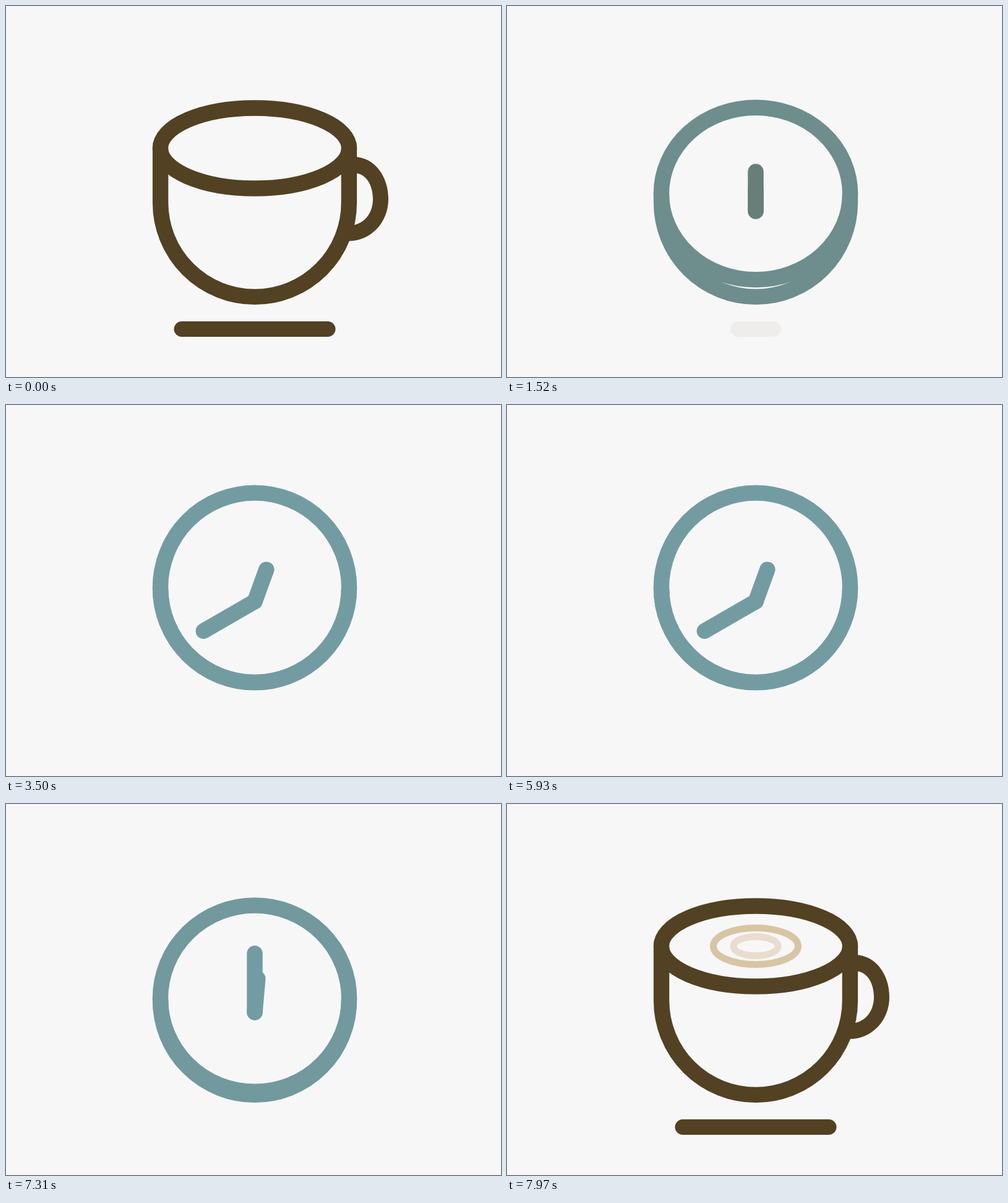
An HTML page with a canvas that plays this animation: 800x600 px, repeating every 8000 ms.

```html
<!DOCTYPE html>
<html lang="en">
<head>
<meta charset="utf-8">
<title>Cup and clock</title>
<style>
html, body { margin: 0; height: 100%; overflow: hidden; background: #f7f7f7; }
canvas { display: block; }
</style>
</head>
<body>
<canvas id="stage" width="800" height="600"></canvas>
<script>
const ctx = document.getElementById('stage').getContext('2d');
const LOOP = 8000, CX = 402, STROKE = 25.4;
const BROWN = [82, 65, 34], TEAL = [115, 156, 162], RUST = [134, 30, 31];

// Handle outline: start point, then four cubic curves
const SLIVER = [557, 292, 562, 302, 567, 315, 566.5, 325, 566, 345, 558, 365, 549.5, 377,
  549.5, 377, 552, 366, 555, 350, 555.5, 332, 556, 318, 556.5, 305, 557, 292];
const HANDLE = [562, 244, 596, 244, 618, 276, 618, 312, 618, 350, 590, 380, 554, 380,
  554, 355, 576, 355, 593, 338, 593, 312, 593, 290, 582, 270, 562, 270];

const clamp = v => Math.max(0, Math.min(1, v));
const lerp = (a, b, k) => a + (b - a) * k;
const inOut = u => u < .5 ? 4 * u ** 3 : 1 - 4 * (1 - u) ** 3;
const outBack = (u, s) => 1 + (s + 1) * (u - 1) ** 3 + s * (u - 1) ** 2;
const span = (t, start, length) => clamp((t - start) / length);
const ease = (t, start, length) => inOut(span(t, start, length));
const mix = (a, b, k) => `rgb(${a.map((v, i) => Math.round(lerp(v, b[i], clamp(k))))})`;

function stroke(color, width, trace) {
  ctx.beginPath();
  trace();
  ctx.strokeStyle = color;
  ctx.lineWidth = width;
  ctx.stroke();
}

const oval = (y, rx, ry) => ctx.ellipse(CX, y, rx, ry, 0, 0, 2 * Math.PI);

function drawHandle(open, color) {
  if (open <= 0) return;
  const p = SLIVER.map((v, i) => lerp(v, HANDLE[i], open));
  const curve = i => ctx.bezierCurveTo(...p.slice(i, i + 6));
  ctx.beginPath();
  ctx.moveTo(p[0], p[1]);
  curve(2);
  curve(8);
  ctx.lineTo(p[14], p[15]);
  curve(16);
  curve(22);
  ctx.fillStyle = color;
  ctx.fill();
}

function drawSaucer(show, color) {
  if (show <= 0) return;
  const half = 118 * (.2 + .8 * show);
  ctx.globalAlpha = show;
  stroke(color, 25, () => {
    ctx.moveTo(CX - half, 522.5);
    ctx.lineTo(CX + half, 522.5);
  });
  ctx.globalAlpha = 1;
}

function drawFoam(t, y) {
  const rings = [[7450, 68.5, 29.5, '#d7c5a3'], [7600, 36, 15.5, '#e8ddce']];
  for (const [start, rx, ry, color] of rings) {
    const g = ease(t, start, 7980 - start);
    if (g <= 0) continue;
    const size = .15 + .85 * g;
    ctx.globalAlpha = clamp(2 * g);
    stroke(color, 11, () => oval(y, rx * size, ry * size));
    ctx.globalAlpha = 1;
  }
}

function drawHand(y, length, degrees, color, width) {
  const a = degrees * Math.PI / 180;
  stroke(color, width, () => {
    ctx.moveTo(CX, y);
    ctx.lineTo(CX + length * Math.sin(a), y - length * Math.cos(a));
  });
}

function draw(t) {
  const back = t > 5000;

  // 0 is the cup, 1 is the clock
  const round = back ? 1 - ease(t, 7200, 560) : ease(t, 1145, 572);
  const lift = back ? 1 - ease(t, 7000, 350) : ease(t, 1530, 410);
  const grow = back ? 1 - ease(t, 7260, 530) : outBack(span(t, 1407, 663), 2);
  const open = back ? outBack(span(t, 7530, 420), 0) : 1 - ease(t, 1145, 330);
  const saucer = back ? ease(t, 7300, 500) : 1 - ease(t, 1145, 490);
  const hop = back ? 13 * Math.sin(Math.PI * span(t, 7590, 290)) : 0;

  const rise = 22 * lift;
  const y = lerp(230, 317.5, round) - rise - hop;
  const color = mix(BROWN, TEAL, round);

  ctx.fillStyle = '#f7f7f7';
  ctx.fillRect(0, 0, 800, 600);
  ctx.lineCap = 'round';

  drawSaucer(saucer, back ? mix(RUST, BROWN, saucer) : mix(BROWN, BROWN, 0));

  ctx.lineCap = 'butt';
  stroke(color, STROKE, () => {
    ctx.moveTo(CX - 152.4, y);
    ctx.lineTo(CX - 152.4, 318 - rise);
    ctx.arc(CX, 318 - rise, 152.4, Math.PI, 0, true);
    ctx.lineTo(CX + 152.4, y);
  });
  stroke(color, STROKE, () => oval(y, 152.6, lerp(65, 153.4, round)));
  drawHandle(open, back ? mix(TEAL, BROWN, .48 + open) : color);

  drawFoam(t, y);

  if (grow > .01) {
    const minute = back
      ? -120 - 240 * ease(t, 5915, 1410)
      : -120 * outBack(span(t, 2400, 1100), .55);
    const hour = back
      ? 20 - 380 * ease(t, 5920, 1635)
      : 20 * ease(t, 2400, 1100);
    const pivot = y + 22.3 + (back ? 5 : 18) * (1 - grow);
    const tint = mix(BROWN, TEAL, grow);
    const width = STROKE * Math.min(1, grow * 4);
    ctx.lineCap = 'round';
    drawHand(pivot, 95.5 * grow, minute, tint, width);
    drawHand(pivot, 55 * grow, hour, tint, width);
  }
}

function frame(now) {
  draw(now % LOOP);
  requestAnimationFrame(frame);
}
requestAnimationFrame(frame);
</script>
</body>
</html>
```
